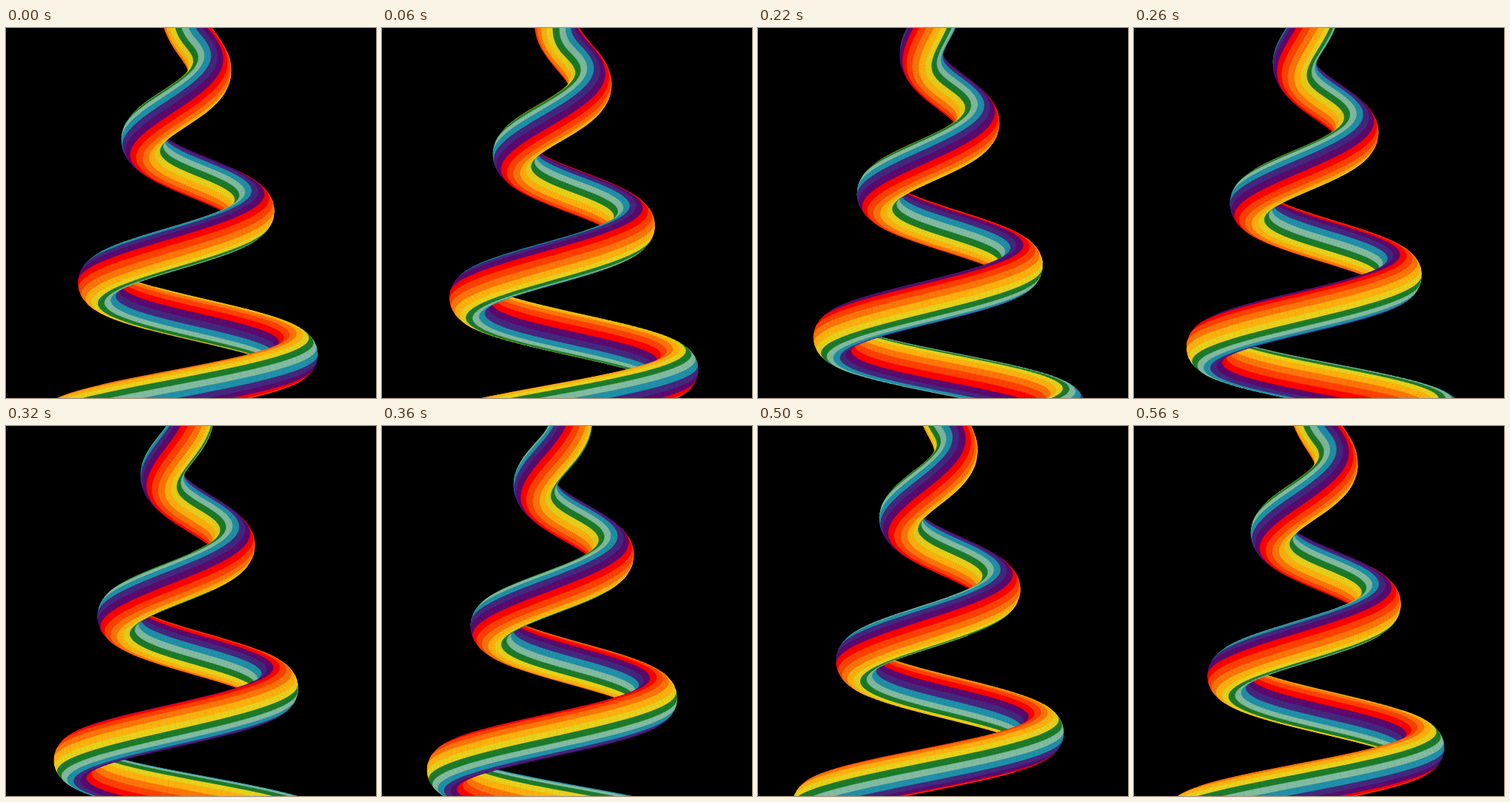
An HTML page with a canvas for the animation above (0.58 s loop, 500 px wide and 500 px high).

```html
<!DOCTYPE html>
<html lang="en">
<head>
<meta charset="utf-8">
<title>Rainbow helix</title>
<style>
  html, body { margin: 0; height: 100%; overflow: hidden; background: #000; }
  canvas { display: block; }
</style>
</head>
<body>
<canvas id="stage" width="500" height="500"></canvas>
<script>
const ctx = document.getElementById('stage').getContext('2d');
const COLORS = ['#ff0000', '#ff4000', '#ff7408', '#ffb00e', '#e9d01a',
                '#1b7b2a', '#82bba0', '#1f90a8', '#45277f', '#5b0a6e'];
const LOOP = 580, TICK = 20;
const PITCH = 195.5, OMEGA = 2 * Math.PI / PITCH;
const AXIS = 244.6, TUBE = 28.8, SLOPE = 0.302, TOP_RADIUS = 14.6, START = 48.5;
const STRIPE = Math.PI / 10; // two palettes around the tube

const dot = (a, b) => a[0] * b[0] + a[1] * b[1] + a[2] * b[2];
const unit = v => v.map(c => c / Math.hypot(...v));
const cross = (a, b) => [a[1] * b[2] - a[2] * b[1], a[2] * b[0] - a[0] * b[2], a[0] * b[1] - a[1] * b[0]];

// Cross-section of the tube at height y; z points at the viewer.
function ring(y, t) {
  const angle = OMEGA * (y - START - PITCH * t);
  const c = Math.cos(angle), s = Math.sin(angle);
  const radius = TOP_RADIUS + SLOPE * y, spin = radius * OMEGA;
  const tangent = unit([SLOPE * c - spin * s, 1, SLOPE * s + spin * c]);
  const along = c * tangent[0] + s * tangent[2];
  const out = unit([c - along * tangent[0], -along * tangent[1], s - along * tangent[2]]);
  const side = cross(tangent, out);
  // Stripe number on the outward side: twist-free along the curve, one palette per loop.
  const climb = Math.hypot(1, SLOPE);
  const base = 1.3 + 10 * t - 10 / (Math.PI * SLOPE * OMEGA) * OMEGA * Math.asinh(spin / climb);
  return { x: AXIS + radius * c, y, z: radius * s, out, side, base,
           facing: Math.atan2(side[2], out[2]) };
}

function vertex(r, stripe) {
  const a = (stripe - r.base) * STRIPE;
  const c = TUBE * Math.cos(a), s = TUBE * Math.sin(a);
  return [r.x + r.out[0] * c + r.side[0] * s, r.y + r.out[1] * c + r.side[1] * s];
}

function drawSegment(a, b) {
  const first = Math.floor(Math.min(a.low, b.low));
  const last = Math.max(a.low, b.low) + 10;
  const clamp = (r, stripe) => vertex(r, Math.min(Math.max(stripe, r.low), r.low + 10));
  for (let k = first; k < last; k++) {
    ctx.fillStyle = ctx.strokeStyle = COLORS[(k % 10 + 10) % 10];
    ctx.beginPath();
    ctx.moveTo(...clamp(a, k));
    ctx.lineTo(...clamp(a, k + 1));
    ctx.lineTo(...clamp(b, k + 1));
    ctx.lineTo(...clamp(b, k));
    ctx.closePath();
    ctx.fill();
    ctx.stroke();
  }
}

function draw(t) {
  ctx.fillStyle = '#000';
  ctx.fillRect(0, 0, 500, 500);
  ctx.lineWidth = 0.6;
  ctx.lineJoin = 'round';
  const segments = [];
  let prev = null;
  for (let y = -44; y <= 566; y += 2) {
    const r = ring(y, t);
    if (prev) r.facing += 2 * Math.PI * Math.round((prev.facing - r.facing) / (2 * Math.PI));
    r.low = r.base + r.facing / STRIPE - 5;
    if (prev) segments.push([prev, r]);
    prev = r;
  }
  segments.sort((p, q) => p[0].z + p[1].z - q[0].z - q[1].z);
  for (const [a, b] of segments) drawSegment(a, b);
}

let shown = -1;
function tick() {
  const step = Math.floor(performance.now() % LOOP / TICK);
  if (step !== shown) draw(step * TICK / LOOP);
  shown = step;
  requestAnimationFrame(tick);
}
tick();
</script>
</body>
</html>
```
